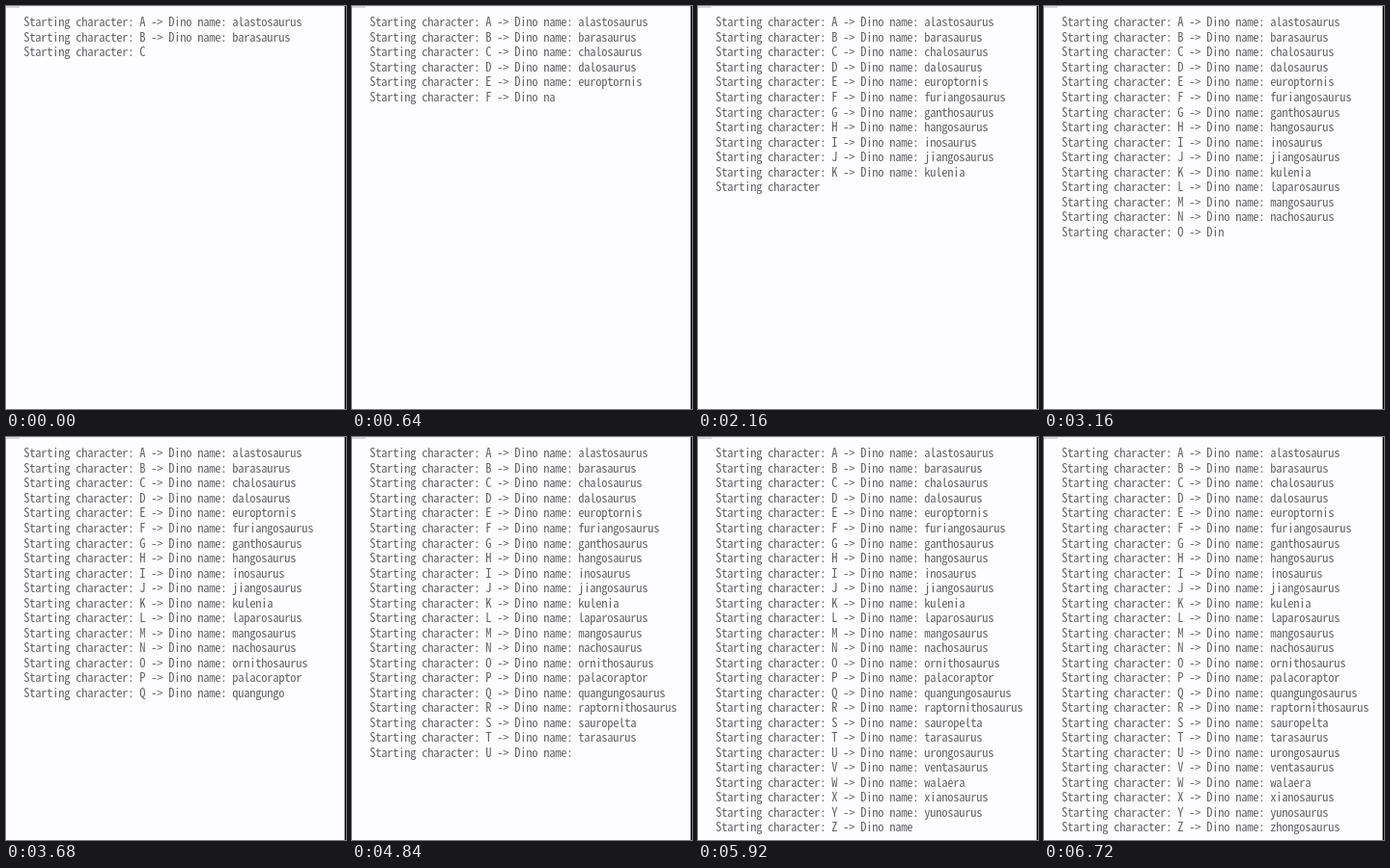
Write an HTML page with a canvas that moves like this. It is 352 px wide and 418 px high and loops after 6.8 s.

```html
<!DOCTYPE html>
<html lang="en">
<head>
<meta charset="utf-8">
<title>Dino names</title>
<style>
  html, body { margin: 0; width: 100%; height: 100%; overflow: hidden; background: #fdfcff; }
  canvas { display: block; }
</style>
</head>
<body>
<canvas id="stage" width="352" height="418"></canvas>
<script>
const ctx = document.getElementById('stage').getContext('2d');
const LOOP = 6800;
const CELL = 6, LINE = 15.52, LEFT = 18.2, BASELINE = 21.4;

const names = `alastosaurus barasaurus chalosaurus dalosaurus europtornis furiangosaurus
  ganthosaurus hangosaurus inosaurus jiangosaurus kulenia laparosaurus mangosaurus
  nachosaurus ornithosaurus palacoraptor quangungosaurus raptornithosaurus sauropelta
  tarasaurus urongosaurus ventasaurus walaera xianosaurus yunosaurus zhongosaurus`.split(/\s+/);

const lines = names.map(name =>
  `Starting character: ${name[0].toUpperCase()} -> Dino name: ${name}`);

// The output arrives in bursts: [time in ms, characters shown so far].
const bursts = [
  [0, 115], [640, 266], [1680, 342], [2160, 533], [3160, 685], [3680, 799],
  [4200, 912], [4840, 985], [5320, 1138], [5920, 1215], [6400, 1229]
];

function rect(color, x, y, w, h) {
  ctx.fillStyle = color;
  ctx.fillRect(x, y, w, h);
}

function drawWindow() {
  rect('#fdfcff', 0, 0, 352, 418);
  rect('#ededef', 0, 0, 351, 1);
  rect('#d6d5d8', 0, 0, 14, 2);
  rect('#000', 350.6, 0, 1.4, 418);
}

function drawText(count) {
  ctx.font = '12.5px "Noto Sans Mono CJK JP", "Noto Sans Mono CJK SC", "Noto Sans Mono", monospace';
  ctx.fillStyle = '#626166';
  lines.forEach((line, row) => {
    const shown = line.slice(0, Math.max(0, count));
    [...shown].forEach((char, column) =>
      ctx.fillText(char, LEFT + column * CELL, BASELINE + row * LINE));
    count -= line.length;
  });
}

function draw() {
  const time = performance.now() % LOOP;
  drawWindow();
  drawText(bursts.findLast(([start]) => start <= time)[1]);
  requestAnimationFrame(draw);
}
draw();
</script>
</body>
</html>
```
